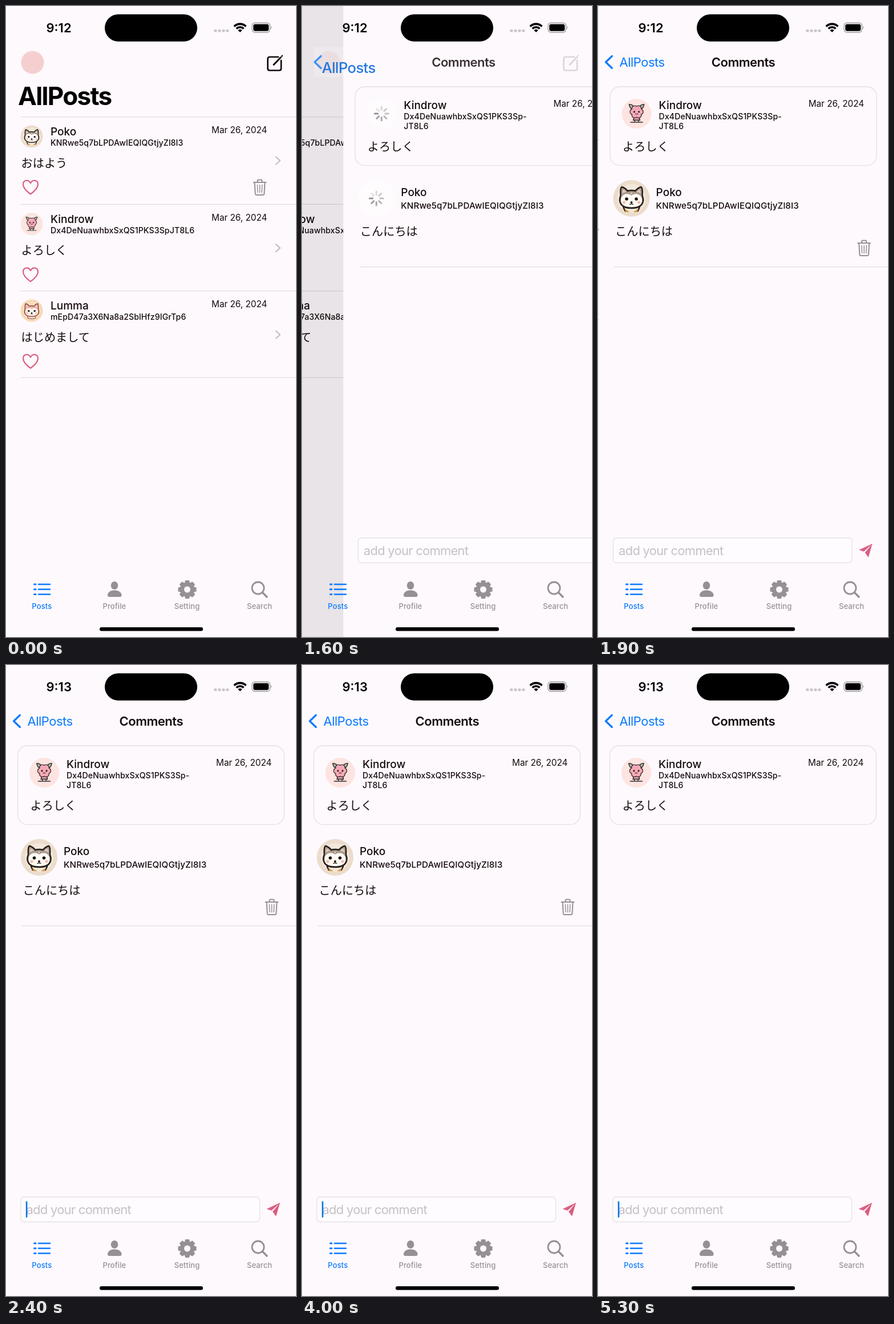
These frames come from a looping animation (508 by 1102 pixels, 5800 ms). An HTML page:

```html
<!DOCTYPE html>
<html lang="en">
<head>
<meta charset="utf-8">
<title>Comments</title>
<style>
  html, body { margin: 0; width: 100%; height: 100%; overflow: hidden; background: #fef9fd; }
  svg { display: block; width: 100vw; height: 100vh; }
  text { font-family: Inter, "Noto Sans CJK JP", "Noto Sans CJK", sans-serif; white-space: pre; }
  .name { font-size: 19px; font-weight: 500; }
  .id { font-size: 14.1px; font-weight: 500; letter-spacing: .1px; }
  .wide { font-size: 15.2px; }
  .date { font-size: 15.3px; text-anchor: end; }
  .kana { font-family: "Noto Sans CJK JP", "Noto Sans CJK", sans-serif; font-size: 20.2px; }
  .tab { font-size: 13px; font-weight: 500; text-anchor: middle; letter-spacing: .1px; }
  .line { fill: none; stroke-linecap: round; stroke-linejoin: round; }
</style>
</head>
<body>
<svg id="stage" viewBox="0 0 508 1102" fill="#150a0d"></svg>
<script>
const LOOP = 5800, STEP = 100, W = 508, H = 1102;
const PAPER = '#fef9fd', BLUE = '#0a7aff', GRAY = '#969094', PINK = '#d95f82', RULE = '#e2dce1';

const users = {
  cat: { name: 'Poko', id: 'KNRwe5q7bLPDAwIEQIQGtjyZl8I3' },
  flower: { name: 'Kindrow', id: 'Dx4DeNuawhbxSxQS1PKS3SpJT8L6' },
  kitten: { name: 'Lumma', id: 'mEpD47a3X6Na8a2SblHfz9IGrTp6' }
};

const text = (x, y, cls, s) => `<text x="${x}" y="${y}" class="${cls}">${s}</text>`;
const at = (x, y, body, scale = 1) => `<g transform="translate(${x} ${y}) scale(${scale})">${body}</g>`;
const line = (d, color, width) => `<path class="line" d="${d}" stroke="${color}" stroke-width="${width}"/>`;
const shape = (d, fill) => `<path d="${d}" fill="${fill}"/>`;
const dot = (x, y, r, fill) => `<circle cx="${x}" cy="${y}" r="${r}" fill="${fill}"/>`;
const rule = (x, y) => `<rect x="${x}" y="${y - .6}" width="${W + 160}" height="1.2" fill="${RULE}"/>`;
const group = (id, body) => `<g id="${id}">${body}</g>`;

// Avatars are drawn in a circle of radius 32 around 0,0.
function catFace(back, glow, fur, muzzle, ink, ears, chest) {
  return dot(0, 0, 32, back) + dot(0, 0, 25, glow) + chest +
    `<g stroke="${ink}" stroke-width="2.4" stroke-linejoin="round">` +
    shape('M-19-5Q-20-18-17-20Q-10-18-7-13Q0-15 7-13Q10-18 17-20Q20-18 19-5C24 8 17 17 0 17C-17 17-24 8-19-5Z', fur) + '</g>' +
    shape('M-16-9L-15-16L-9-12ZM16-9L15-16L9-12Z', ears) +
    shape('M0-5C6-10 16-8 18 0C20 11 13 15 0 15C-13 15-20 11-18 0C-16-8-6-10 0-5Z', muzzle) +
    dot(-8.5, 1, 2.8, '#171312') + dot(8.5, 1, 2.8, '#171312') +
    dot(-13, 7, 2.5, '#f3b9ac') + dot(13, 7, 2.5, '#f3b9ac') +
    dot(0, 7, 2, '#2b1b18') + line('M-3 10Q-1.500 11.500 0 9Q1.500 11.500 3 10', '#2b1b18', 1.2) +
    dot(0, -9, 1.6, ears);
}
const robe = line('M-14 16L-11 22M14 16L11 22', '#28211e', 2.6) + shape('M-12 14L-9 23Q0 26 9 23L12 14Z', '#f1ead9') +
  shape('M-12 18L-3 24L-10 24ZM12 18L3 24L10 24Z', '#d99648');
const paws = `<g stroke="#7d4238" stroke-width="1.6">${shape('M-12 12L-11 22Q0 25 11 22L12 12Z', '#fbe3d6')}</g>`;

const petals = (r, fill) => Array.from({ length: 6 }, (_, i) => {
  const a = i * Math.PI / 3;
  return dot(8 * Math.cos(a), 8 * Math.sin(a) - 4, r, fill);
}).join('');
const flower = dot(0, 0, 32, '#fde4e0') +
  `<g stroke="#35302f" stroke-width="2">${shape('M-4-12Q-8-20-16-20Q-15-11-8-9ZM4-12Q8-20 16-20Q15-11 8-9Z', '#b5bfb0')}
   ${shape('M-5 6L-7 14H7L5 6Z', '#f3a5b4')}</g>` +
  line('M-4 15V18M4 15V18M-13 18.500H13', '#35302f', 1.8) +
  petals(7, '#35282a') + petals(5.4, '#f4a9b7') + dot(0, -4, 9, '#f4a9b7') +
  dot(-5, -4, 1.9, '#241719') + dot(5, -4, 1.9, '#241719') + line('M-2.500 0Q0 2.500 2.500 0', '#241719', 1.3);

const faces = {
  cat: catFace('#ecdccb', '#f3e8db', '#a99a8f', '#fffaf4', '#211b19', '#e4cbbb', robe),
  flower,
  kitten: catFace('#f7d9b5', '#f9dfc1', '#e9a99d', '#fff1ea', '#85483e', '#f9d2c9', paws)
};
const avatar = (who, x, y, r) => at(x, y, faces[who], r / 32);

function spinner(x, y, r) {
  let bars = dot(0, 0, r, '#fffcfe');
  for (let i = 0; i < 8; i++) {
    bars += `<path d="M6.5 0H12" stroke="#77727a" stroke-width="3" stroke-linecap="round"
      opacity="${.2 + .08 * i}" transform="rotate(${45 * i - 135})"/>`;
  }
  return at(x, y, bars);
}

const heart = line('M0 12.5C-7 7.5-13 2-13-4.5C-13-12-4-14 0-6.5C4-14 13-12 13-4.5C13 2 7 7.5 0 12.5Z', PINK, 2.2);
const trash = line('M-11-9H11M-4-9V-12Q-4-13.5-2-13.5H2Q4-13.5 4-12V-9M-9-9L-7.8 11Q-7.6 13-5.5 13H5.5Q7.6 13 7.8 11L9-9', GRAY, 2) +
  line('M-4.2-4.5L-3.7 8.5M0-4.5V8.5M4.2-4.5L3.7 8.5', GRAY, 1.5);
const compose = line('M477 89H462Q458.500 89 458.500 92.500V109Q458.500 112.500 462 112.500H478.500Q482 112.500 482 109V95', '#150a0d', 2.7) +
  line('M469 102.500L481.500 89.500', '#150a0d', 3) + line('M483.500 87.300L483.800 87', '#150a0d', 2.6);

function post(y, who, message, own) {
  const { name, id } = users[who];
  return at(0, y, avatar(who, 45, 228, 19.5) + text(78, 226.3, 'name', name) + text(78, 244.3, 'id', id) +
    text(457.5, 222.3, 'date', 'Mar 26, 2024') + text(26.5, 281.5, 'kana', message) +
    line('M473 263.500L480 270L473 276.500', '#c4bfc4', 2.3) + at(43, 316, heart) +
    (own ? at(444.5, 317, trash) : ''));
}

const posts = rule(26, 193.8) + post(0, 'cat', 'おはよう', true) +
  rule(26, 346.4) + post(152.7, 'flower', 'よろしく') +
  rule(26, 497.7) + post(304, 'kitten', 'はじめまして') + rule(26, 649);

const comments = `<rect width="${W}" height="${H}" fill="${PAPER}"/>
  <rect x="20.600" y="141" width="466.800" height="137.600" rx="17" fill="none" stroke="#e6e0e6" stroke-width="1.400"/>` +
  group('cardFace', avatar('flower', 67, 188, 26)) +
  text(106, 180.3, 'name', users.flower.name) +
  text(106, 198.3, 'id', users.flower.id.slice(0, 23) + '-') +
  text(106, 215.3, 'id', users.flower.id.slice(23)) +
  text(465.5, 176.3, 'date', 'Mar 26, 2024') + text(42.5, 252.5, 'kana', 'よろしく') +
  group('reply', group('replyFace', avatar('cat', 58, 336, 32)) +
    text(101, 332.3, 'name', users.cat.name) + text(101, 354.3, 'id wide', users.cat.id) +
    text(29.5, 401, 'kana', 'こんにちは') + at(465.5, 423, trash) + rule(28, 455.6)) +
  group('loading', spinner(67, 188, 26) + spinner(58, 336, 32)) +
  `<rect x="26" y="929" width="418.500" height="43.500" rx="6" fill="#fefcfe" stroke="#e7e1e7" stroke-width="1.300"/>
  <text x="35.500" y="959" font-size="22" letter-spacing="-.75" fill="#c5c2c6">add your comment</text>
  <rect id="caret" x="34.800" y="936.500" width="2.600" height="28.500" rx="1.300" fill="#0a74ee"/>` +
  shape('M456.500 950L480 939L473 963L467 954.500L479 940.500L465 952.800Z', PINK);

const nav = group('logo', `<rect x="20.500" y="72" width="52" height="52" fill="${PAPER}"/>` + dot(46.5, 98.5, 20, '#f5cfd0')) +
  group('compose', compose) + '<text id="backLabel">AllPosts</text>' +
  group('backArrow', line('M24.500 87.500L13.500 98L24.500 108.500', BLUE, 3.2)) +
  '<text id="title" y="105.800" font-size="22" font-weight="600" letter-spacing="-.5" text-anchor="middle">Comments</text>';

function gear() {
  let teeth = '';
  for (let i = 0; i < 8; i++) {
    teeth += `<path d="M-5-10L-3.400-16H3.400L5-10Z" transform="rotate(${i * 45})"/>`;
  }
  return `<g fill="${GRAY}">${teeth}<circle r="9" fill="none" stroke="${GRAY}" stroke-width="7"/></g>`;
}

const tabs = line('M57 1010H77M57 1018.800H77M57 1027.600H77', BLUE, 2.5) +
  line('M49.500 1010H52M49.500 1018.800H52M49.500 1027.600H52', BLUE, 3) +
  `<ellipse cx="190" cy="1012" rx="6.300" ry="7" fill="${GRAY}"/>` +
  shape('M178 1029C178 1023 184 1020.500 190 1020.500S202.500 1023 202.500 1029Q202.500 1032 199.500 1032H181Q178 1032 178 1029Z', GRAY) +
  at(317.5, 1019, gear()) +
  `<circle cx="441.500" cy="1016.500" r="10.500" fill="none" stroke="${GRAY}" stroke-width="2.800"/>` +
  line('M449.500 1024.500L457 1032', GRAY, 3.4) +
  ['Posts', 'Profile', 'Setting', 'Search'].map((s, i) =>
    `<g fill="${i ? GRAY : BLUE}">${text(62.8 + 127.1 * i, 1053, 'tab', s)}</g>`).join('') +
  '<rect x="164" y="1085" width="181" height="6.500" rx="3.250" fill="#000"/>';

const arc = (r, width) => {
  const k = r * Math.SQRT1_2;
  return `<path d="M${410 - k} ${46 - k}A${r} ${r} 0 0 1 ${410 + k} ${46 - k}" fill="none" stroke="#000" stroke-width="${width}"/>`;
};
const status = '<text id="clock" x="70.500" y="46" font-size="22" font-weight="600" fill="#000"></text>' +
  '<rect x="173" y="14.500" width="162" height="47.500" rx="23.750" fill="#000"/>' +
  [0, 1, 2, 3].map(i => `<rect x="${364.5 + 7 * i}" y="41" width="4.800" height="4.500" rx="1.300" fill="#c9c4c9"/>`).join('') +
  arc(14.6, 3.6) + arc(9, 3.4) + shape('M410 46L406.300 42.300A5.200 5.200 0 0 1 413.700 42.300Z', '#000') +
  `<rect x="431" y="29.500" width="31.500" height="16.500" rx="5" fill="none" stroke="#9d989c" stroke-width="1.300"/>
  <rect x="433.200" y="31.700" width="27.100" height="12.100" rx="3.200" fill="#000"/>` +
  shape('M464 35Q466.500 37.700 464 40.500Z', '#9d989c');

document.getElementById('stage').innerHTML =
  `<rect width="${W}" height="${H}" fill="${PAPER}"/>` + group('posts', posts) +
  `<rect id="dim" width="${W}" height="${H}" fill="#000"/>` +
  group('comments', comments) + nav + tabs + status;

const el = id => document.getElementById(id);
const set = (id, attrs) => { for (const k in attrs) el(id).setAttribute(k, attrs[k]); };
const clamp = v => Math.max(0, Math.min(1, v));
const mix = (a, b, k) => a + (b - a) * k;

// Critically damped push from the right edge.
function pushProgress(t) {
  if (t < 1500) return 0;
  if (t >= 2000) return 1;
  const x = 1.58 + .0186 * (t - 1500);
  return 1 - (1 + x) * Math.exp(-x);
}

function caretOpacity(t) {
  if (t < 2400) return 0;
  if (t > 3300 && t < 3800) return clamp((Math.abs(t - 3550) - 50) / 200);
  if (t > 4700 && t < 5300) return .5 + .5 * Math.cos((t - 4700) / 600 * 2 * Math.PI);
  return 1;
}

function draw(t) {
  const p = pushProgress(t), gap = W * (1 - p), q = p ** 1.2;

  set('posts', { transform: `translate(${-.3 * W * p} 0)` });
  set('dim', { opacity: .1 * p });
  set('comments', { transform: `translate(${gap} 0)` });

  set('backLabel', {
    x: mix(21, 37.5, q), y: mix(173, 105.8, q), 'font-size': mix(44, 22, q),
    'font-weight': Math.round(mix(700, 400, q)), 'letter-spacing': mix(-.038, -.023, q) + 'em',
    fill: `rgb(${10 * p},${122 * p},${255 * p})`, opacity: 1 - p * (1 - p)
  });
  set('logo', { opacity: clamp(1 - p ** 2) });
  set('compose', { opacity: 1 - p });
  set('backArrow', { opacity: clamp(2.2 * (p - .5)), transform: `translate(${.12 * gap} 0)` });
  set('title', { x: 254.3 + (.305 + .00126 * gap) * gap, opacity: clamp(1.65 * (p - .35)) });

  const loading = t < 1700;
  set('loading', { opacity: +loading });
  set('cardFace', { opacity: +!loading });
  set('replyFace', { opacity: +!loading });

  const gone = clamp((t - 4000) / 300);
  set('reply', { opacity: (1 - gone) ** 1.5 });
  set('caret', { opacity: caretOpacity(t) });
  el('clock').textContent = t < 2400 ? '9:12' : '9:13';
}

const start = performance.now();
function tick() {
  const t = (performance.now() - start) % LOOP;
  draw(Math.floor(t / STEP) * STEP);
  requestAnimationFrame(tick);
}
tick();
</script>
</body>
</html>
```
